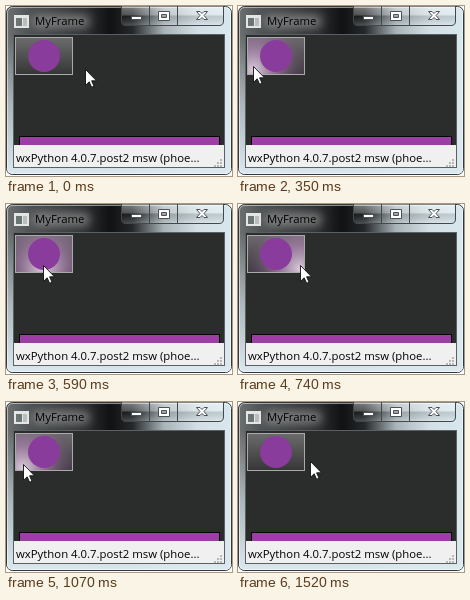
Write an HTML page that moves like this. It is 226 px wide and 170 px high and loops after 1.55 s.

```html
<!DOCTYPE html>
<html lang="en">
<head>
<meta charset="utf-8">
<title>MyFrame</title>
<style>
  html, body { margin: 0; width: 100%; height: 100%; overflow: hidden; background: #fff; }
  svg { display: block; width: 100vw; height: 100vh; }
  text { font: 11.35px "Open Sans", "Noto Sans", sans-serif; }
</style>
</head>
<body>
<svg viewBox="0 0 226 170">
  <defs>
    <linearGradient id="glass">
      <stop offset="0" stop-color="#6c7071"/>
      <stop offset=".12" stop-color="#4b4e50"/>
      <stop offset=".36" stop-color="#2a2c2d"/>
      <stop offset=".46" stop-color="#101112"/>
      <stop offset=".56" stop-color="#25282a"/>
      <stop offset=".7" stop-color="#a9b4b9"/>
      <stop offset=".85" stop-color="#d3dfe4"/>
      <stop offset="1" stop-color="#d8e8ee"/>
    </linearGradient>
    <linearGradient id="edge" x2="0" y2="1">
      <stop offset="0" stop-color="#dbe8ee" stop-opacity="0"/>
      <stop offset=".5" stop-color="#dbe8ee" stop-opacity=".6"/>
      <stop offset="1" stop-color="#dbe8ee"/>
    </linearGradient>
    <linearGradient id="caption" x2="0" y2="1">
      <stop offset="0" stop-color="#fff" stop-opacity=".4"/>
      <stop offset=".48" stop-color="#fff" stop-opacity=".22"/>
      <stop offset=".5" stop-color="#000" stop-opacity=".12"/>
      <stop offset="1" stop-color="#fff" stop-opacity=".2"/>
    </linearGradient>
    <linearGradient id="gloss" x2="0" y2="1">
      <stop offset="0" stop-color="#6c6c6c"/>
      <stop offset="1" stop-color="#353535"/>
    </linearGradient>
    <radialGradient id="light" gradientUnits="userSpaceOnUse" cx="38" cy="65" r="52">
      <stop offset="0" stop-color="#f6e6f6" stop-opacity=".85"/>
      <stop offset=".45" stop-color="#b98bbd" stop-opacity=".62"/>
      <stop offset="1" stop-color="#75507c" stop-opacity=".15"/>
    </radialGradient>
    <filter id="blur" x="-30%" y="-100%" width="160%" height="300%"><feGaussianBlur stdDeviation="5"/></filter>
  </defs>

  <!-- window frame -->
  <rect x=".5" y=".5" width="225" height="168" rx="6" fill="url(#glass)" stroke="#30383c"/>
  <rect x="1" y="29" width="224" height="139" rx="5" fill="url(#edge)"/>
  <rect x="1.5" y="1.5" width="223" height="166" rx="5" fill="none" stroke="#fff" stroke-opacity=".5"/>
  <rect x="26" y="9" width="58" height="13" rx="6" fill="#aaa" opacity=".6" filter="url(#blur)"/>
  <rect x="8" y="9" width="15" height="13" fill="#e4e6e6"/>
  <rect x="10" y="12" width="6" height="8" fill="#6b7672"/>
  <rect x="17" y="12" width="4" height="8" fill="#b9bdbd"/>
  <text x="29" y="19">MyFrame</text>

  <!-- caption buttons -->
  <g fill="url(#caption)" stroke="#40484c">
    <path d="M115.5 0V15Q115.5 19.5 120 19.5H143.5V0"/>
    <path d="M143.5 0V19.5H171.5V0"/>
    <path d="M171.5 0V19.5H213Q217.5 19.5 217.5 15V0"/>
  </g>
  <g fill="#fff" stroke="#4a5257">
    <rect x="125.5" y="10.5" width="10" height="3"/>
    <path d="M152.5 5.5H163.5V14.5H152.5ZM155.5 8.5V11.5H160.5V8.5Z" fill-rule="evenodd"/>
    <path d="M190.5 5.5H194L196 7.5L198 5.5H201.5L198 9.5L201.5 13.5H198L196 11.5L194 13.5H190.5L194 9.5Z"/>
  </g>

  <!-- client area -->
  <rect x="7" y="28" width="212" height="134" fill="#596164"/>
  <rect x="8" y="29" width="210" height="111" fill="#2b2d2c"/>
  <rect x="13.5" y="130.5" width="200" height="9" fill="#9b3fa5" stroke="#050505"/>
  <rect x="8" y="139" width="210" height="22" fill="#f0f0f0"/>
  <text x="10" y="156">wxPython 4.0.7.post2 msw (phoe...</text>
  <path d="M214 153h2v2h-2zM211 156h2v2h-2zM214 156h2v2h-2zM208 159h2v2h-2zM211 159h2v2h-2zM214 159h2v2h-2z" fill="#b8b8b8"/>

  <!-- glossy button -->
  <rect x="9" y="31" width="58" height="38" fill="url(#gloss)"/>
  <rect id="hover" x="9" y="31" width="58" height="38" fill="url(#light)"/>
  <rect x="9.5" y="31.5" width="57" height="37" fill="none" stroke="#aaa"/>
  <circle cx="38" cy="50" r="16" fill="#8a3c9c"/>

  <path id="cursor" d="M.5.5V16.3L4.2 12.8L6.6 18.2L9 17.2L6.6 11.8H11.5Z" fill="#fff" stroke="#111" stroke-width=".9"/>
</svg>
<script>
const LOOP = 1550;
// turning points of the pointer tip: time, x, y
const turns = [[0, 79, 63], [403, 5, 60], [770, 67, 61], [1136, 6, 62.5], [1520, 72, 59], [LOOP, 72, 59]];
const [cursor, hover, light] = ["cursor", "hover", "light"].map(id => document.getElementById(id));

function pointer(time) {
  const i = turns.findIndex(turn => turn[0] > time);
  const [t0, x0, y0] = turns[i - 1], [t1, x1, y1] = turns[i];
  const u = (time - t0) / (t1 - t0);
  return [x0 + (x1 - x0) * u, y0 + (y1 - y0) * u].map(Math.round);
}

function draw(time) {
  const [x, y] = pointer(time % LOOP);
  cursor.setAttribute("transform", `translate(${x} ${y})`);
  light.setAttribute("cx", x);
  light.setAttribute("cy", y + 4);
  hover.setAttribute("visibility", x >= 9 && x < 67 ? "visible" : "hidden");
}

const start = performance.now();
function tick() {
  draw(performance.now() - start);
  requestAnimationFrame(tick);
}
tick();
</script>
</body>
</html>
```
